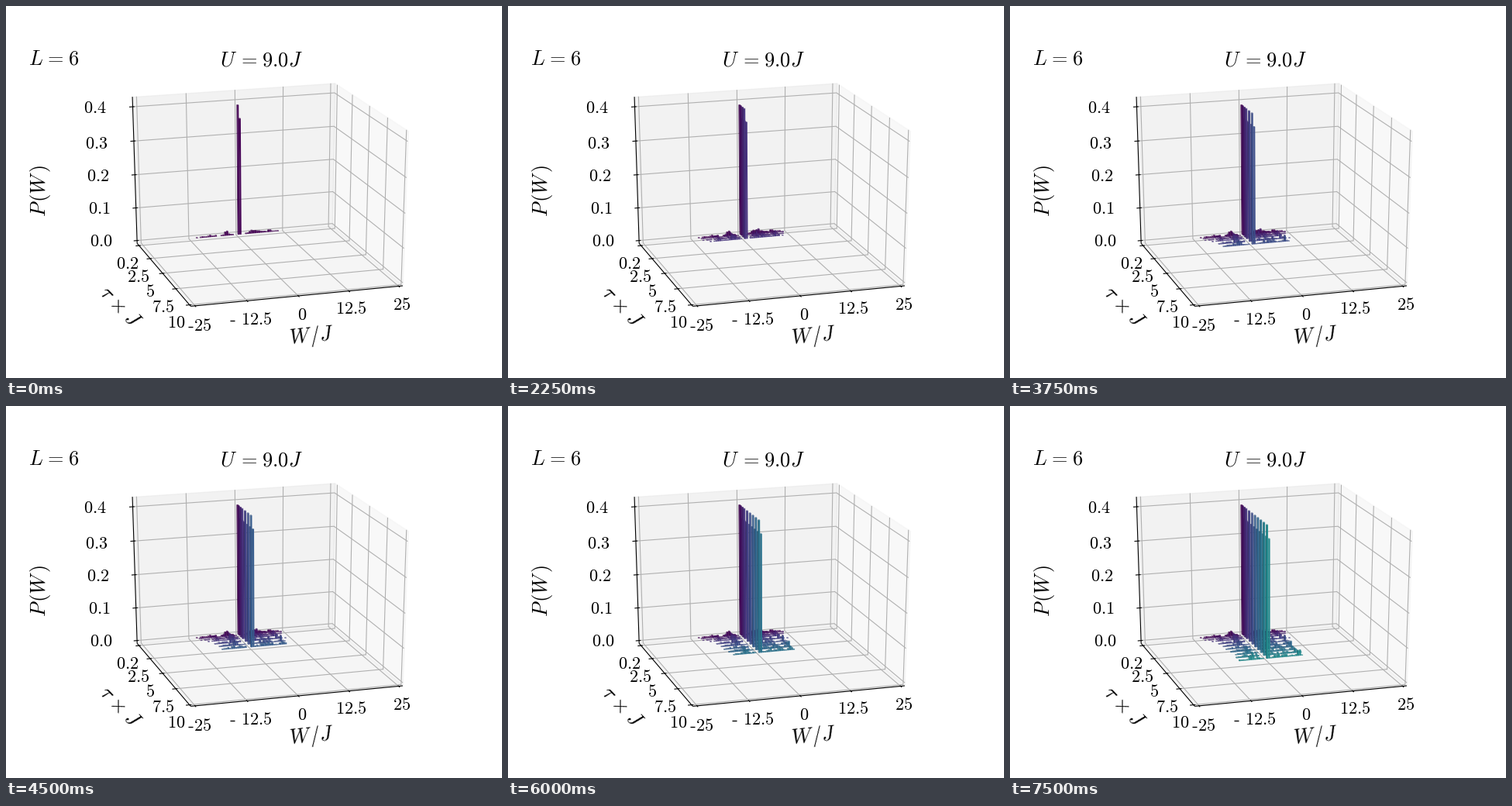
These frames come from a looping animation (640x480 px, 8000 ms). A matplotlib script:

```python
import numpy as np
import matplotlib.pyplot as plt
from matplotlib.animation import FuncAnimation
from matplotlib.collections import LineCollection, PolyCollection

plt.rcParams["mathtext.fontset"] = "cm"

WIDTH, HEIGHT, DPI = 640, 480, 100
ELEV, AZIM, DIST = np.radians(21), np.radians(17), 10
SCALE = np.array([2681.1, 1997.8])
CENTER = np.array([335.1, 237.4])

W_LIM, T_LIM, Z_LIM = (-25, 25), (0, 10), (0, 0.42)
W_TICKS = [-25, -12.5, 0, 12.5, 25]
T_TICKS = [0.2, 2.5, 5, 7.5, 10]
Z_TICKS = [0, 0.1, 0.2, 0.3, 0.4]

INTERVAL, HOLD, FRAMES = 250, 3, 32
TAUS = [0.2, 0.4, 0.7] + [0.5 * i for i in range(2, 10)]
BIN, BAR, DEPTH = 0.5, 0.42, 0.1

# (centre, spread, height) of the side lobes for short and long ramps
EARLY = [(-9.3, 1.4, 0.003), (-6.8, 0.8, 0.007), (-3, 0.9, 0.015),
         (3.8, 1.0, 0.015), (5.6, 0.9, 0.010), (8.3, 0.6, 0.009),
         (10.4, 0.8, 0.003)]
LATE = [(-6, 1.1, 0.004), (-3.3, 1.2, 0.014), (2.4, 1.0, 0.009),
        (5, 1.4, 0.009), (8.3, 0.5, 0.018)]


def padded(lim):
    pad = (lim[1] - lim[0]) / 48
    return lim[0] - pad, lim[1] + pad


def unit(value, lim):
    return (value - lim[0]) / (lim[1] - lim[0]) - 0.5


def project(w, tau, z):
    """Perspective view of a point, in pixels from the top left."""
    x, y, h = unit(tau, T_LIM), unit(w, W_LIM), unit(z, Z_LIM)
    sa, ca, se, ce = np.sin(AZIM), np.cos(AZIM), np.sin(ELEV), np.cos(ELEV)
    toward = x * ca - y * sa
    right = x * sa + y * ca
    up = h * ce - toward * se
    depth = DIST - (toward * ce + h * se)
    return CENTER + np.array([right, -up]) / depth * SCALE


def path(*points):
    return [project(*p) for p in points]


W0, W1 = padded(W_LIM)
T0, T1 = padded(T_LIM)
Z0, Z1 = padded(Z_LIM)

fig = plt.figure(figsize=(WIDTH / DPI, HEIGHT / DPI), dpi=DPI, facecolor="white")
ax = fig.add_axes([0, 0, 1, 1])
ax.set_xlim(0, WIDTH)
ax.set_ylim(HEIGHT, 0)
ax.axis("off")


def draw_box():
    panes = [
        (0.95, path((W1, T0, Z0), (W1, T1, Z0), (W1, T1, Z1), (W1, T0, Z1))),
        (0.90, path((W0, T0, Z0), (W1, T0, Z0), (W1, T0, Z1), (W0, T0, Z1))),
        (0.925, path((W0, T0, Z0), (W1, T0, Z0), (W1, T1, Z0), (W0, T1, Z0))),
    ]
    for gray, corners in panes:
        color = (gray, gray, gray, 0.5)
        ax.add_collection(PolyCollection([corners], facecolors=[color],
                                         edgecolors=[color], linewidths=1))

    grid = [path((w, T1, Z0), (w, T0, Z0), (w, T0, Z1)) for w in W_TICKS]
    grid += [path((W0, t, Z0), (W1, t, Z0), (W1, t, Z1)) for t in T_TICKS]
    grid += [path((W0, T0, z), (W1, T0, z), (W1, T1, z)) for z in Z_TICKS]
    ax.add_collection(LineCollection(grid, colors="#b0b0b0", linewidths=0.8))

    lines = [path((W0, T0, Z0), (W0, T0, Z1)),
             path((W0, T0, Z0), (W0, T1, Z0)),
             path((W0, T1, Z0), (W1, T1, Z0))]
    dw, dt = (W1 - W0) / 120, (T1 - T0) / 120
    lines += [path((W0 - 2 * dw, T0, z), (W0 + dw, T0, z)) for z in Z_TICKS]
    lines += [path((W0 - 2 * dw, t, Z0), (W0 + dw, t, Z0)) for t in T_TICKS]
    lines += [path((w, T1 + 2 * dt, Z0), (w, T1 - dt, Z0)) for w in W_TICKS]
    ax.add_collection(LineCollection(lines, colors="black", linewidths=0.8))


def label(x, y, text, size=16, **kw):
    style = dict(ha="center", va="baseline", color="black")
    style.update(kw)
    ax.text(x, y, f"${text}$", fontsize=size, **style)


def hyphen(x, y):
    ax.plot([x, x + 5.9], [y, y], color="black", lw=1, solid_capstyle="butt")


def draw_labels():
    for i, z in enumerate(Z_TICKS):
        label(122.7 - 2 * i, [310.5, 267.5, 226.5, 183.5, 138.5][i], f"{z:.1f}")
    for x, y, text in [(157, 339, "0.2"), (171, 356, "2.5"), (186, 375, "5"),
                       (203, 395, "7.5"), (220, 415, "10")]:
        label(x, y, text)
    for x, y, text in [(253.2, 419, "25"), (323, 411, "12.5"), (382, 405, "0"),
                       (445.2, 397, "12.5"), (511, 392, "25")]:
        label(x, y, text)
    hyphen(235.2, 414.3)
    hyphen(289.2, 406.2)

    label(29, 76, r"L\hspace{0.08}=\hspace{0.08}6", 19, ha="left")
    label(329, 78, r"U\hspace{0.19}=\hspace{0.1}9.0J", 19)
    label(44.5, 239, r"P\hspace{0.1}(W\hspace{0.12})", 19, va="center", rotation=90)
    label(394.5, 427, r"W\hspace{0.05}/J", 19, va="center", rotation=5.7)
    label(147, 388, r"\tau\hspace{0.12}\times\hspace{0.05}J", 19,
          va="center", rotation=-46)


def lobes(w, parts):
    return sum(h * np.exp(-((w - c) / s) ** 2 / 2) for c, s, h in parts)


def heights(k, w):
    rng = np.random.default_rng(40 + k)
    mix = min(1, k / 6)
    p = (1 - mix) * lobes(w, EARLY) + mix * lobes(w, LATE)
    p *= rng.uniform(0.2, 1.1, w.size)
    p[np.isclose(w, 0)] = 0.391
    p[np.isclose(w, BIN)] = 0.351
    return p


def bars(k):
    """Visible faces of one row of bars, far ones first."""
    tau = TAUS[k]
    base = np.array(plt.cm.viridis(k / 21)[:3])
    w = np.arange(-24, 25) * BIN
    p = heights(k, w)
    faces, colors = [], []
    for c, h in zip(w[::-1], p[::-1]):
        if h < 0.001:
            continue
        a, b, near = c - BAR / 2, c + BAR / 2, tau + DEPTH
        faces += [
            path((a, tau, h), (b, tau, h), (b, near, h), (a, near, h)),
            path((a, tau, 0), (a, near, 0), (a, near, h), (a, tau, h)),
            path((a, near, 0), (b, near, 0), (b, near, h), (a, near, h)),
        ]
        colors += [base * 0.9, base * 0.7, base]
    row = PolyCollection(faces, facecolors=colors, edgecolors="none",
                         linewidths=0, zorder=5 + k)
    return ax.add_collection(row)


draw_box()
draw_labels()
rows = [bars(k) for k in range(len(TAUS))]


def update(i):
    for k, row in enumerate(rows):
        row.set_visible(k <= i // HOLD)
    return rows


anim = FuncAnimation(fig, update, frames=FRAMES, interval=INTERVAL,
                     repeat=True, repeat_delay=0, init_func=lambda: update(0))
plt.show()
```
